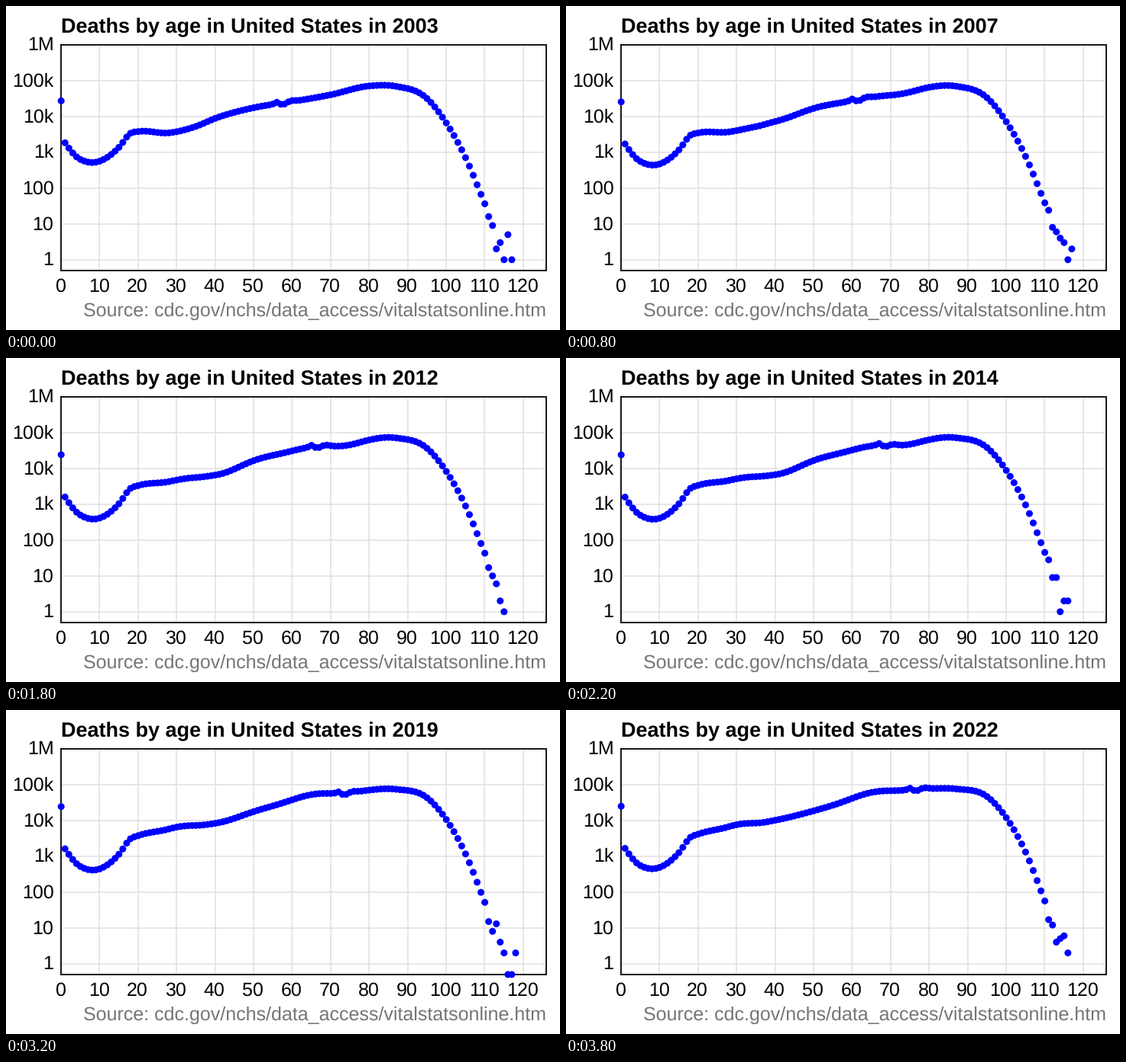
A matplotlib script that plays this animation: 725 px wide and 425 px high, repeating every 4 s.

```python
import numpy as np
import matplotlib.pyplot as plt
from matplotlib.animation import FuncAnimation

plt.rcParams["font.family"] = "Liberation Sans"
plt.rcParams["text.hinting"] = "none"
plt.rcParams["text.hinting_factor"] = 1

W, H, DPI = 725, 425, 100
PT = 72 / DPI
LEFT, RIGHT, TOP, BOTTOM = 72, 707, 51, 347
STEP = 5.04              # pixels per year of age
ONE, DECADE = 332.8, 47  # pixel row of count 1, pixels per factor of ten
FIRST, YEARS = 2003, 20

# Curve of the first year: (age, pixel row)
CURVE = [(0, 124), (1, 179), (2, 186), (4, 197.5), (6, 203), (9, 204.5),
         (12, 198), (15, 185), (18, 166.5), (20, 164.3), (28, 166), (35, 157.5),
         (40, 147), (50, 133), (60, 125), (70, 116), (80, 104.5), (87, 105),
         (95, 121), (100, 153), (105, 198.5), (110, 259)]

# Bumps: (centre, width, pixels down)
TREND = [(8, 8, 3), (30, 5.5, -14.5), (65.5, 7, -13), (103, 8, -13)]
SWING = [(12, 8, 5.5), (42, 4.5, 8), (75, 4.5, 6)]
COHORT = [(1943, .8, -1.3), (1945.5, .6, 2.4), (1947, .6, -2.2)]


def bumps(x, parts):
    return sum(h * np.exp(-((x - c) / w) ** 2 / 2) for c, w, h in parts)


def smooth(x, knots):
    """Cubic Hermite curve through the knots."""
    kx, ky = np.array(knots, float).T
    m = np.gradient(ky, kx)
    i = np.clip(np.searchsorted(kx, x, side="right") - 1, 0, len(kx) - 2)
    h = kx[i + 1] - kx[i]
    t = (x - kx[i]) / h
    s = t * t * (3 - 2 * t)
    bend = h * t * (1 - t) * ((1 - t) * m[i] - t * m[i + 1])
    return (1 - s) * ky[i] + s * ky[i + 1] + bend


def tail(year):
    """Random small counts from age 111 up to the oldest death."""
    rng = np.random.default_rng(year)
    rate = 37 * 0.55 ** np.arange(1, 12) + 0.1
    n = rng.poisson(rate)
    return n[:np.flatnonzero(n)[-1] + 1]


AGES = np.arange(111)
BASE = smooth(AGES, CURVE) + 0.4


def dots(year):
    t = (year - FIRST) / (YEARS - 1)
    y = (BASE + t ** 1.3 * bumps(AGES, TREND)
         + np.sin(np.pi * t) * bumps(AGES, SWING)
         + bumps(year - AGES, COHORT))
    # zero counts sit on the lower border
    old = ONE - DECADE * np.log10(np.maximum(tail(year), 0.5))
    y = np.concatenate([y, old])
    return np.column_stack([LEFT + 0.2 + STEP * np.arange(len(y)), y])


fig = plt.figure(figsize=(W / DPI, H / DPI), dpi=DPI, facecolor="white")
ax = fig.add_axes([0, 0, 1, 1])
ax.set(xlim=(0, W), ylim=(H, 0))
ax.axis("off")


def label(x, y, text, size=25, **style):
    return ax.text(x, y, text, fontsize=size * PT, va="baseline", **style)


def line(xs, ys, color, width=1.5):
    ax.plot(xs, ys, color=color, lw=width * PT, solid_capstyle="projecting",
            solid_joinstyle="miter", zorder=1)


GRID = "#e0e0e0"
for age in range(0, 121, 10):
    x = LEFT + STEP * age
    if age:
        line([x, x], [TOP, BOTTOM], GRID)
    label(x - 0.8, 374.7, str(age), ha="center")

for k, name in enumerate(["1", "10", "100", "1k", "10k", "100k", "1M"]):
    y = ONE - DECADE * k
    if k < 6:
        line([LEFT, RIGHT], [y, y], GRID)
    label(62.4, y + 7.5, name, ha="right")

line([LEFT, RIGHT, RIGHT, LEFT, LEFT], [TOP, TOP, BOTTOM, BOTTOM, TOP], "black", 1.8)
label(707, 407, "Source: cdc.gov/nchs/data_access/vitalstatsonline.htm",
      ha="right", color="#757575")
title = label(71.6, 35.2, "", 27, weight="bold")
points = ax.scatter([], [], s=(9 * PT) ** 2, c="#0000ff", edgecolors="none",
                    linewidths=0, zorder=3)


def update(i):
    year = FIRST + i
    title.set_text(f"Deaths by age in United States in {year}")
    points.set_offsets(dots(year))
    return title, points


anim = FuncAnimation(fig, update, frames=YEARS, interval=200, repeat=True)
plt.show()
```
